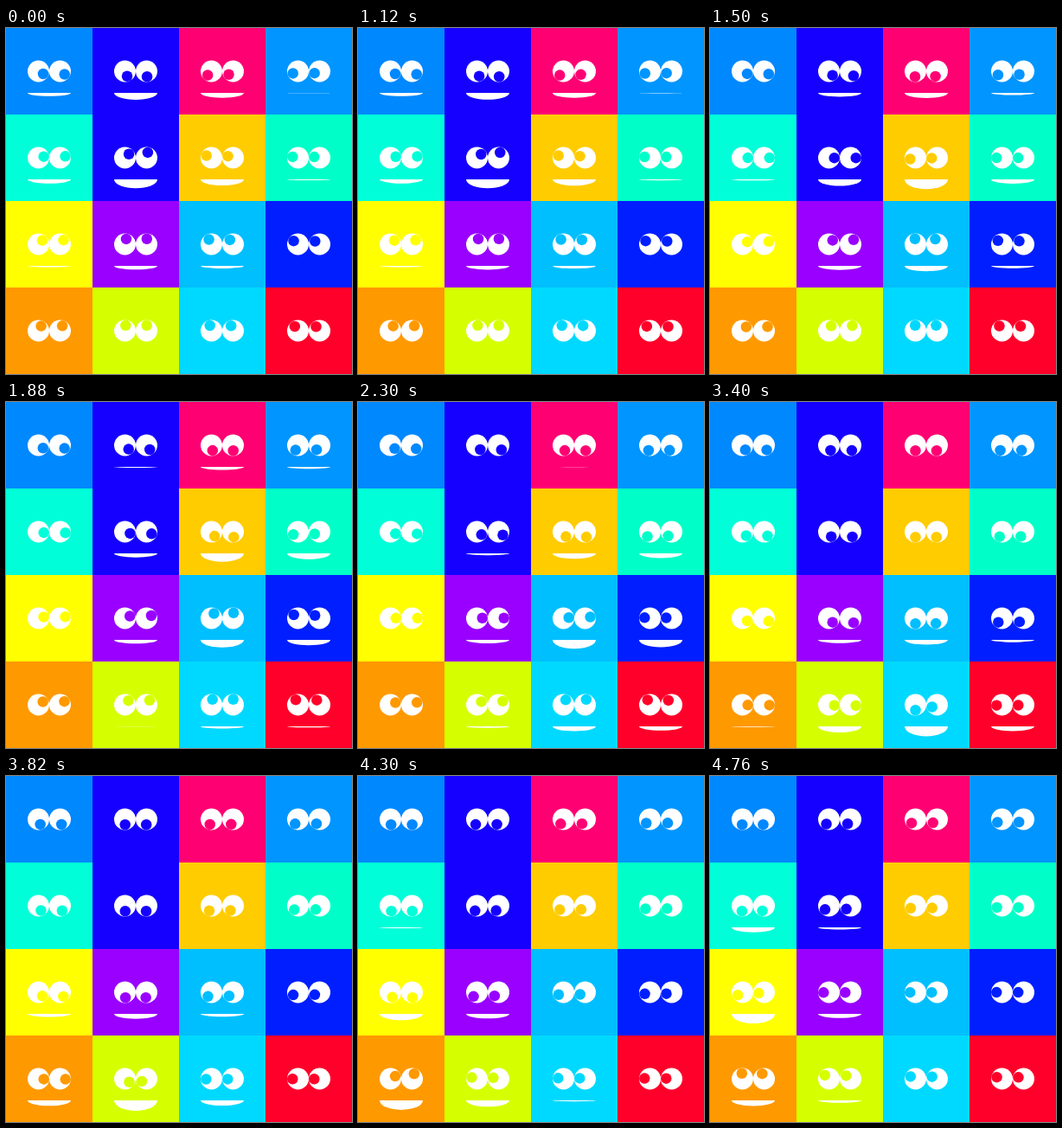
Write an HTML page with a canvas that moves like this. It is 400 by 400 pixels and loops after 4.8 s.

```html
<!DOCTYPE html>
<html>
<head>
<meta charset="utf-8">
<style>
html, body { margin: 0; height: 100%; overflow: hidden; }
canvas { display: block; }
</style>
</head>
<body>
<canvas width="400" height="400"></canvas>
<script>
const ctx = document.querySelector('canvas').getContext('2d');
const LOOP = 4800, START = 1100, CELL = 100, REACH = 200;
const hues = [208, 245, 333, 205, 171, 245, 48, 167, 60, 276, 195, 233, 36, 70, 189, 350];

// The unseen point the faces watch rests, then passes these at equal intervals
const stops = [[169, 121], [237, 158], [277, 209], [286, 269], [265, 330],
  [236, 361], [137, 356], [65, 329], [26, 252]];

// Catmull-Rom curve through the stops
function watched(t) {
  const last = stops.length - 1;
  const s = Math.max(0, (t - START) / (LOOP - START)) * last;
  const i = Math.floor(s), u = s - i;
  const [a, b, c, d] = [-1, 0, 1, 2].map(k => stops[Math.min(last, Math.max(0, i + k))]);
  return [0, 1].map(k => b[k] + u / 2 * (c[k] - a[k] +
    u * (2 * a[k] - 5 * b[k] + 4 * c[k] - d[k] +
    u * (3 * (b[k] - c[k]) + d[k] - a[k]))));
}

function disc(x, y, r, color) {
  ctx.fillStyle = color;
  ctx.beginPath();
  ctx.arc(x, y, r, 0, 2 * Math.PI);
  ctx.fill();
}

function face(x, y, color, tx, ty) {
  ctx.fillStyle = color;
  ctx.fillRect(x, y, CELL, CELL);
  const cx = x + 50, cy = y + 50;
  for (const ex of [cx - 12.5, cx + 12.5]) {
    const a = Math.atan2(ty - cy, tx - ex);
    disc(ex, cy, 12.5, '#fff');
    disc(ex + 6.25 * Math.cos(a), cy + 6.25 * Math.sin(a), 6.25, color);
  }
  // The mouth opens as the point comes near
  const open = 12.5 * (1 - Math.hypot(tx - cx, ty - cy) / REACH);
  if (open <= 0) return;
  ctx.fillStyle = '#fff';
  ctx.beginPath();
  ctx.ellipse(cx, cy + 25, 25, open, 0, 0, Math.PI);
  ctx.fill();
}

function draw(now) {
  const [tx, ty] = watched(now % LOOP);
  hues.forEach((h, i) =>
    face(i % 4 * CELL, Math.floor(i / 4) * CELL, `hsl(${h}, 100%, 50%)`, tx, ty));
  requestAnimationFrame(draw);
}
draw(0);
</script>
</body>
</html>
```
